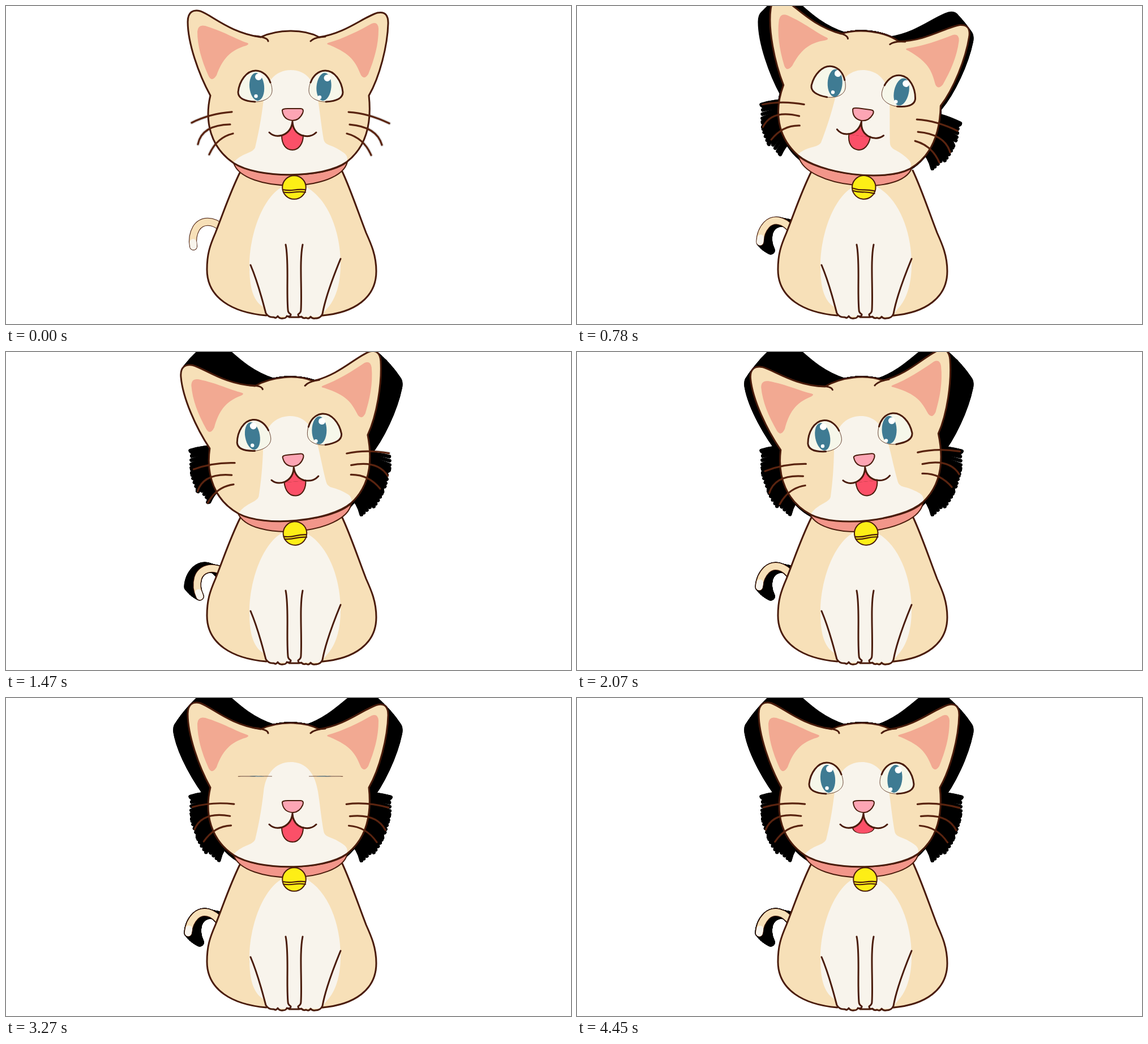
Animation, 998 px wide and 561 px high, one loop 4.51 s. Source, as an HTML page without scripts:

```html
<!DOCTYPE html>
<html lang="en">
<head>
<meta charset="utf-8">
<title>Swaying cat</title>
<style>
@property --now { syntax: "<number>"; inherits: true; initial-value: 0; }
@keyframes clock { to { --now: 4510; } }
html, body { margin: 0; width: 100%; height: 100%; overflow: hidden; background: #fff; }
svg { display: block; width: 100%; height: 100%; animation: clock 4510ms linear infinite; }

/* every pose follows from the time --t in ms */
.pose {
  --sway: min(var(--t), max(1200 - var(--t), min(var(--t) - 2400, 0))) / 600;
  --head: calc(10.8deg * var(--sway));
  --look: calc(11px * var(--sway));
  --tail: calc(-15deg * sin(var(--t) * .3deg));
  --whisk: calc(5.6deg * (1 - cos(var(--t) * .6deg)));
}
.live { --t: var(--now); }
.trail { opacity: calc((var(--now) - var(--t)) * .1); }

.head { transform: rotate(var(--head)); transform-origin: 503px 177px; }
.collar { transform: rotate(calc(var(--head) * .85)); transform-origin: 503px 177px; }
.bell { transform: rotate(var(--head)); transform-origin: 509px 303px; }
.tail { transform: rotate(var(--tail)); transform-origin: 364px 384px; }
.wl { transform: rotate(var(--whisk)); transform-origin: 400px 207px; }
.wr { transform: rotate(calc(var(--whisk) * -1)); transform-origin: 605px 207px; }
.iris { transform: translateX(var(--look)); }
.eyes {
  transform: scaleY(clamp(.02, max((3270 - var(--t)) / 270, (var(--t) - 3400) / 260), 1));
  transform-origin: 503px 138px;
}
.tongue {
  transform: scaleY(calc(1 - .31 * (1 - cos((max(var(--t), 3600) - 3600) * .6deg))));
  transform-origin: 506px 228px;
}

.line { fill: none; stroke: #4a1c0c; stroke-width: 3; stroke-linecap: round; stroke-linejoin: round; }
.edge { stroke: #4a1c0c; stroke-width: 2; stroke-linejoin: round; }
.fur { fill: #f7e0b8; }
.white { fill: #f8f4ec; }
.whisker { fill: none; stroke: #5a2410; stroke-width: 3.2; stroke-linecap: round; }
.black { fill: #000; stroke: #000; stroke-width: 3; }
.black .hair { fill: none; stroke-width: 6.5; stroke-linecap: round; }
.black .tail { fill: none; stroke-width: 15; stroke-linecap: round; }
</style>
</head>
<body>
<svg viewBox="0 0 998 561" preserveAspectRatio="none">
<defs>
  <path id="skull" d="M361 158C340 120 321 65 321 28C321 10 331 6 343 9C365 17 395 47 450 55C480 41 525 40 553 55C600 48 630 20 656 12C670 9 675 17 675 30C674 70 660 125 641 158C646 205 637 248 602 275C560 305 445 305 402 277C362 250 350 205 361 158Z"/>
  <path id="hairL" d="M328 206Q360 190 399 187M339 244Q346 210 396 209M359 262Q372 232 401 225"/>
  <path id="hairR" d="M677 207Q640 189 605 187M664 245Q655 213 607 209M645 263Q632 233 602 225"/>
  <path id="curl" d="M382 392C364 376 345 378 336 392C329 404 329 414 331 424"/>
  <g id="shade" class="black">
    <g class="tail"><use href="#curl"/></g>
    <g class="head">
      <use href="#skull"/>
      <g class="wl hair"><use href="#hairL"/></g>
      <g class="wr hair"><use href="#hairR"/></g>
    </g>
  </g>
  <path id="ball" d="M410 152C412 132 425 114 441 114C460 114 470 135 470 149C470 162 455 169 440 169C422 168 410 163 410 152Z" fill="#f6f7ea" stroke="#4a1c0c" stroke-width=".8"/>
  <path id="lid" class="line" d="M440 169C422 168 410 163 410 152C412 132 425 114 441 114C454 114 463 124 467 135"/>
</defs>

<!-- black trail left behind by the moving parts -->
<g>
  <use href="#shade" class="pose trail" style="--t:0"/>
  <use href="#shade" class="pose trail" style="--t:30"/>
  <use href="#shade" class="pose trail" style="--t:90"/>
  <use href="#shade" class="pose trail" style="--t:150"/>
  <use href="#shade" class="pose trail" style="--t:210"/>
  <use href="#shade" class="pose trail" style="--t:270"/>
  <use href="#shade" class="pose trail" style="--t:330"/>
  <use href="#shade" class="pose trail" style="--t:390"/>
  <use href="#shade" class="pose trail" style="--t:450"/>
  <use href="#shade" class="pose trail" style="--t:510"/>
  <use href="#shade" class="pose trail" style="--t:570"/>
  <use href="#shade" class="pose trail" style="--t:630"/>
  <use href="#shade" class="pose trail" style="--t:690"/>
  <use href="#shade" class="pose trail" style="--t:750"/>
  <use href="#shade" class="pose trail" style="--t:810"/>
  <use href="#shade" class="pose trail" style="--t:870"/>
  <use href="#shade" class="pose trail" style="--t:930"/>
  <use href="#shade" class="pose trail" style="--t:990"/>
  <use href="#shade" class="pose trail" style="--t:1050"/>
  <use href="#shade" class="pose trail" style="--t:1110"/>
  <use href="#shade" class="pose trail" style="--t:1170"/>
  <use href="#shade" class="pose trail" style="--t:1230"/>
  <use href="#shade" class="pose trail" style="--t:1290"/>
  <use href="#shade" class="pose trail" style="--t:1350"/>
  <use href="#shade" class="pose trail" style="--t:1410"/>
  <use href="#shade" class="pose trail" style="--t:1470"/>
  <use href="#shade" class="pose trail" style="--t:1530"/>
  <use href="#shade" class="pose trail" style="--t:1590"/>
  <use href="#shade" class="pose trail" style="--t:1650"/>
  <use href="#shade" class="pose trail" style="--t:1710"/>
  <use href="#shade" class="pose trail" style="--t:1770"/>
  <use href="#shade" class="pose trail" style="--t:1830"/>
  <use href="#shade" class="pose trail" style="--t:1890"/>
  <use href="#shade" class="pose trail" style="--t:1950"/>
  <use href="#shade" class="pose trail" style="--t:2010"/>
  <use href="#shade" class="pose trail" style="--t:2070"/>
  <use href="#shade" class="pose trail" style="--t:2130"/>
  <use href="#shade" class="pose trail" style="--t:2190"/>
  <use href="#shade" class="pose trail" style="--t:2250"/>
  <use href="#shade" class="pose trail" style="--t:2310"/>
</g>

<g class="live pose">
  <g class="tail" fill="none" stroke-linecap="round">
    <use href="#curl" stroke="#4a1c0c" stroke-width="14"/>
    <use href="#curl" stroke="#f7e0b8" stroke-width="12"/>
    <path d="M330.500 417L331 424" stroke="#f8f4ec" stroke-width="12"/>
  </g>

  <path class="fur" d="M414 292C396 328 385 362 370 400C360 423 355 438 355 465C355 515 400 541 460 546L474 550L545 550C610 543 654 515 654 468C654 440 645 420 636 400C622 364 609 324 593 290Z"/>
  <path class="white" d="M490 318C455 335 430 400 430 460C430 500 438 522 456 532L462 548L556 548L566 535C585 515 591 485 591 455C591 400 570 340 528 318Z"/>
  <path class="line" d="M414 292C396 328 385 362 370 400C360 423 355 438 355 465C355 515 400 541 460 546M559 546C615 541 654 515 654 468C654 440 645 420 636 400C622 364 609 324 593 290M500 549H518"/>
  <path class="line" d="M432 457C446 490 453 520 459 542Q464 550 473 549Q477 552 480 547Q483 552 489 551Q495 551 496 547Q503 549 503 544Q498 541 498 536C495 500 500 450 494 421M524 421C518 450 523 500 521 536Q521 541 516 544Q516 550 522 548Q525 552 530 550Q535 553 538 548Q541 552 546 551Q556 551 559 543C564 515 577 480 591 446"/>

  <path class="collar edge" fill="#f2968a" d="M402 277C440 304 565 306 603 275C590 329 420 331 402 277Z"/>

  <g class="head">
    <use href="#skull" class="fur"/>
    <path class="white" d="M503 113C475 113 458 135 455 165C451 200 446 225 440 250Q438 255 428 259Q410 266 402 276C445 304 560 304 602 275Q605 266 598 260Q585 250 570 245Q562 242 561 235C556 205 555 190 551 165C546 135 532 113 503 113Z"/>
    <use href="#skull" class="line"/>
    <path class="line" d="M440 53Q462 55 463 62M564 54Q545 55 538 62"/>
    <g fill="#f2a992">
      <path d="M338 45Q339 32 352 35C385 45 405 58 426 65Q431 67 424 70C395 78 382 95 372 122Q364 135 358 124C345 95 338 70 338 45Z"/>
      <path d="M569 65C595 58 625 43 646 31Q657 27 658 40C658 70 650 95 640 120Q633 131 627 122C617 98 610 85 572 69Q564 67 569 65Z"/>
    </g>
    <g class="eyes">
      <use href="#ball"/>
      <use href="#ball" transform="translate(1005 0) scale(-1 1)"/>
      <g class="iris">
        <g fill="#3f7b93">
          <ellipse cx="443" cy="142.500" rx="13" ry="24.500" transform="rotate(-5 443 142)"/>
          <ellipse cx="561.500" cy="142.500" rx="13" ry="24.500" transform="rotate(5 561.500 142)"/>
        </g>
        <g fill="#fff">
          <circle cx="446" cy="125" r="6"/><circle cx="441.500" cy="159" r="3.200"/>
          <circle cx="567.500" cy="127" r="6"/><circle cx="554" cy="161" r="3.200"/>
        </g>
      </g>
      <use href="#lid"/>
      <use href="#lid" transform="translate(1005 0) scale(-1 1)"/>
    </g>
    <path class="tongue edge" fill="#fb5068" d="M487 228C487 245 495 254 506 254C517 254 525 243 525 228Z"/>
    <path fill="#fb5068" d="M487 229Q504 222 506 206Q507 222 525 229Z"/>
    <path class="line" d="M465 223Q474 232 488 228Q504 222 506 204Q507 222 522 228Q538 233 548 223"/>
    <path class="edge" fill="#fda5b4" d="M488 185Q487 181 498 181L520 181Q527 181 524 189Q518 202 506 202Q490 201 488 185Z"/>
    <g class="wl"><use href="#hairL" class="whisker"/></g>
    <g class="wr"><use href="#hairR" class="whisker"/></g>
  </g>

  <g class="bell">
    <circle class="edge" cx="509" cy="320" r="20.800" fill="#fdee16"/>
    <path class="line" style="stroke-width:2.200" d="M489 324Q499 326 509 324.500T529 324M490 328.500Q499 330 509 328.500T529 328.500"/>
  </g>
</g>
</svg>
</body>
</html>
```
